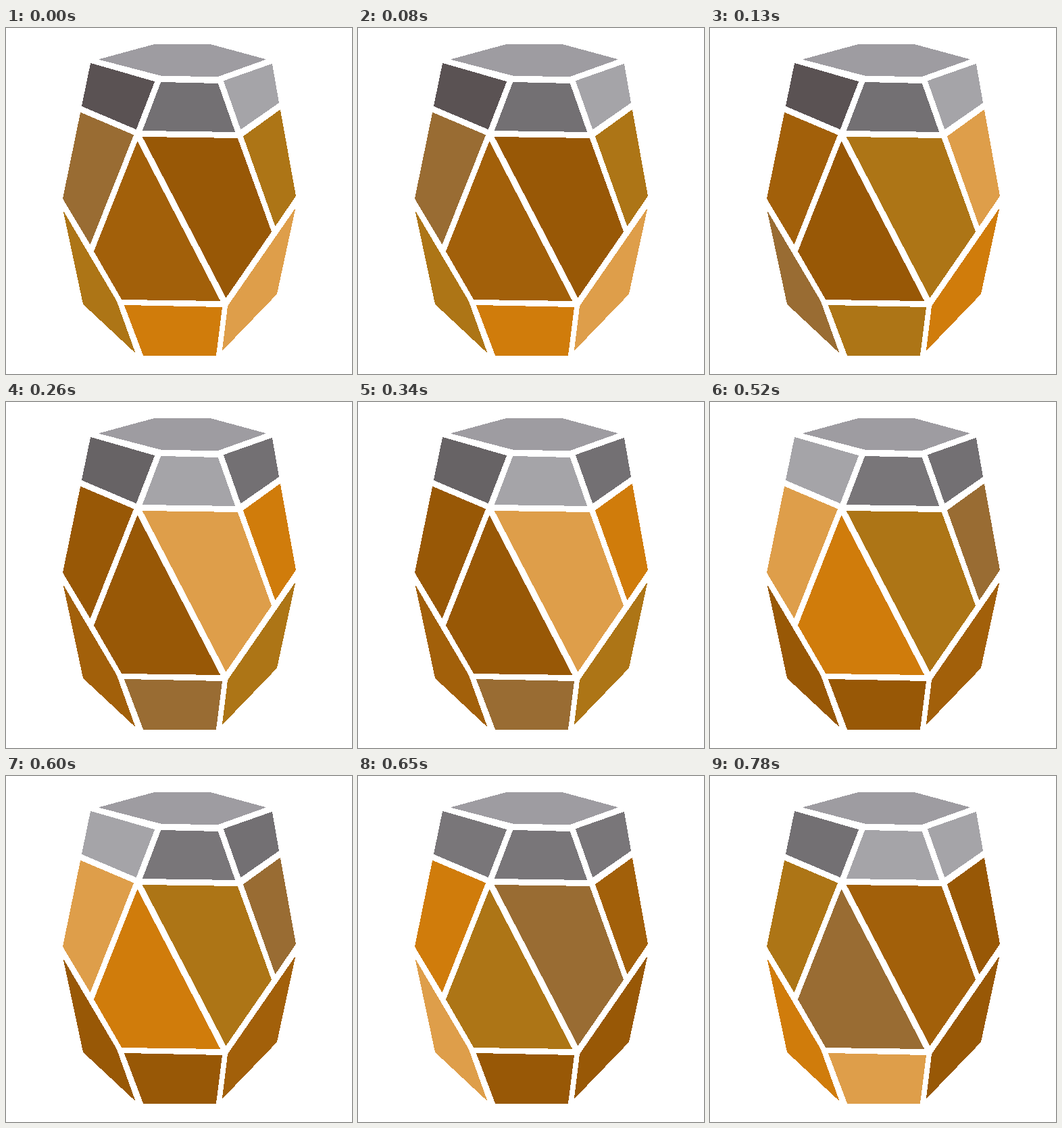
An HTML page that plays this animation: 512 by 512 pixels, repeating every 0.91 s.

```html
<!DOCTYPE html>
<html lang="en">
<head>
<meta charset="utf-8">
<title>Faceted barrel</title>
<style>
html, body { margin: 0; width: 100%; height: 100%; overflow: hidden; background: #fff; }
svg { display: block; width: 100vw; height: 100vh; }
polygon { stroke-width: 1; stroke-linejoin: round; }
</style>
</head>
<body>
<svg viewBox="0 0 512 512">
  <g id="barrel" transform="translate(.5 .5)" shape-rendering="crispEdges"></g>
</svg>
<script>
const STEP = 130;
const COLORS = {
  light: '#de9e4a', orange: '#d07c0b', gold: '#ad7516', brown: '#996c33',
  dark: '#a2600a', deep: '#985806',
  silver: '#a5a4a8', top: '#9e9ca1', grey: '#797679', slate: '#737073',
  dusk: '#676365', night: '#5a5253'
};

// One lap of colour: a light comes on, then fades to the deep base.
const FADE = ['light', 'orange', 'gold', 'brown', 'dark', 'deep', 'deep'];
const GLOW = [...FADE.slice(0, -1), 'gold'];
const LEFT = ['silver', 'grey', 'slate', 'night', 'night', 'dusk', 'dusk'];
const FRONT = ['silver', 'slate', 'slate', 'silver', 'grey', 'grey', 'grey'];
const RIGHT = ['silver', 'silver', 'silver', 'slate', 'slate', 'slate', 'grey'];

const barrel = document.getElementById('barrel');
const facets = [];

// start is the step at which the facet begins its lap.
function facet(points, lap, start = 0) {
  const shape = document.createElementNS('http://www.w3.org/2000/svg', 'polygon');
  shape.setAttribute('points', points);
  barrel.append(shape);
  facets.push({ shape, lap, start });
}

facet('138,46 219,24 302,24 383,46 313,71 230,70', ['top']);
facet('125,52 219,79 192,149 112,115', LEFT, 4);
facet('229,80 313,82 338,153 202,151', FRONT, 6);
facet('393,53 322,78 347,149 403,110', RIGHT, 6);

// The light runs from the lower right up over the barrel and down its left.
facet('427,268 328,411 320,476 400,393', FADE, 0);
facet('405,121 351,160 398,292 428,248', GLOW, 1);
facet('202,161 342,163 392,301 325,398', GLOW, 2);
facet('194,168 130,330 171,401 316,403', FADE, 3);
facet('110,125 188,158 124,319 84,252', FADE, 4);
facet('85,272 163,404 190,479 114,408', FADE, 5);
facet('175,410 319,413 310,484 203,484', FADE, 6);

function draw(ms) {
  const step = Math.floor(ms / STEP) % FADE.length;
  for (const { shape, lap, start } of facets) {
    const color = COLORS[lap[(step - start + FADE.length) % lap.length]];
    shape.setAttribute('fill', color);
    shape.setAttribute('stroke', color);
  }
}

function tick() {
  draw(performance.now());
  requestAnimationFrame(tick);
}
tick();
</script>
</body>
</html>
```
